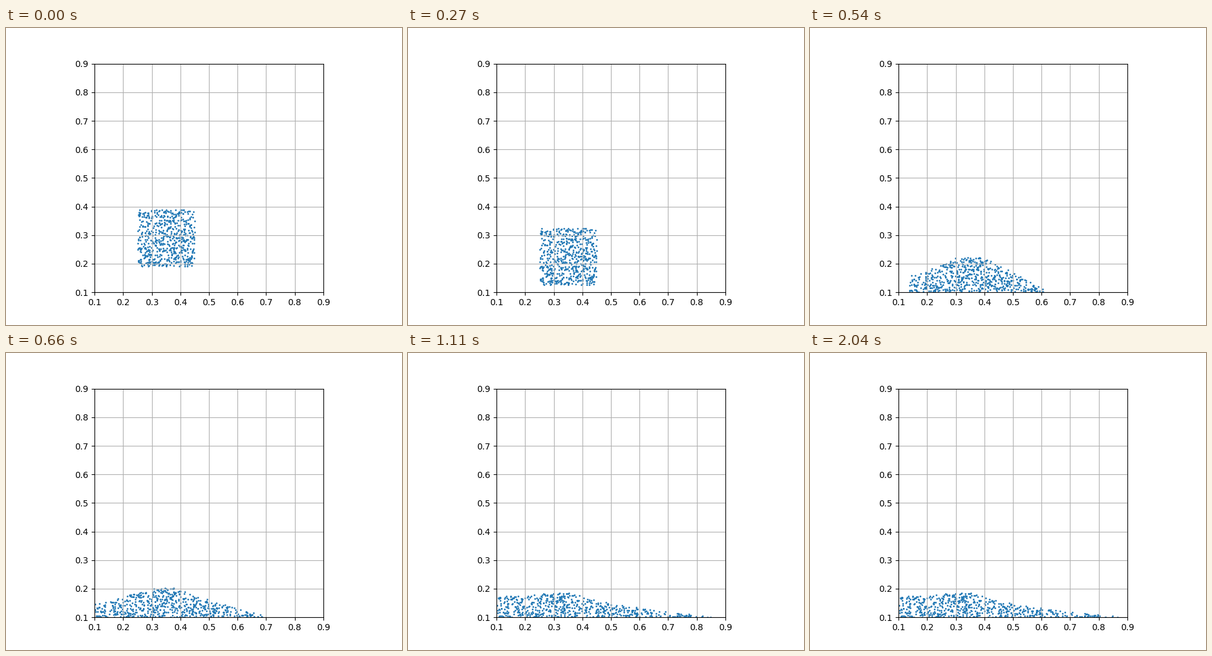
Animation, 640 px wide and 480 px high, one loop 2100 ms. Source, as a matplotlib script:

```python
import numpy as np
import matplotlib.pyplot as plt
from matplotlib.animation import FuncAnimation

FRAMES, INTERVAL = 70, 30
COUNT = 600
FLOOR, WALL = 0.099, 0.1
GRAVITY, LEAD = 0.000744, 5.2   # per frame^2, frames already fallen at start
T_HIT, T_SPLASH, T_SPREAD, T_SLOPE, T_REST = 10, 14, 22, 30, 47

rng = np.random.default_rng(7)
u, v = rng.random((2, COUNT))   # place of each grain within the block


def pile(height, base, top, bend):
    """Fill a mound evenly, keeping the grains in their layers.

    base, top and bend each hold a left and a right value.
    """
    h = np.linspace(0, 1, 400)
    left, right = (t + (b - t) * (1 - h) ** p
                   for b, t, p in zip(base, top, bend))
    left = np.maximum(left, WALL)
    area = np.cumsum(right - left)
    row = np.interp(v, area / area[-1], h)
    lo, hi = np.interp(row, h, left), np.interp(row, h, right)
    return np.array([lo + u * (hi - lo), FLOOR + height * row])


def falling(k):
    return np.array([0.25 + 0.2 * u,
                     0.2 + 0.2 * v - GRAVITY * (k + LEAD) ** 2 / 2])


def hermite(k, t0, t1, p0, p1, v0, v1):
    d = t1 - t0
    t = (k - t0) / d
    return (p0 * (1 + 2 * t) * (1 - t) ** 2 + v0 * d * t * (1 - t) ** 2
            + p1 * t * t * (3 - 2 * t) + v1 * d * t * t * (t - 1))


hit = falling(T_HIT)
splash = pile(0.164, (0.183, 0.535), (0.26, 0.41), (0.8, 0.75))
spread = pile(0.105, (-0.08, 0.72), (0.32, 0.39), (1, 1.25))
slope = pile(0.09, (-0.95, 0.83), (0.35, 0.36), (1, 1.35))

# The middle of the block is still a little above the floor at the splash.
splash[1] += 0.018 * np.sin(np.pi * u) ** 2 * (1 - v) ** 2

# The right flank stretches and thins while the left stays put.
reach = np.clip((slope[0] - 0.38) / 0.4, 0, 1.1)
slide = np.array([0.083 * reach ** 2,
                  (slope[1] - FLOOR) * (1 / (1 + 0.415 * reach) - 1)])
creep = 0.012 * reach * np.clip(1 - reach, 0, 1)

v_hit = np.array([0 * u, 0 * v - GRAVITY * (T_HIT + LEAD)])
v_splash = (spread - splash) / (T_SPREAD - T_SPLASH) * [[1.05], [1.8]]
v_spread = (slope - spread) / (T_SLOPE - T_SPREAD) * 1.5
v_slope = 2 * slide / (T_REST - T_SLOPE)

POSES = [(T_HIT, hit, v_hit), (T_SPLASH, splash, v_splash),
         (T_SPREAD, spread, v_spread), (T_SLOPE, slope, v_slope)]


def settling(k):
    t = min((k - T_SLOPE) / (T_REST - T_SLOPE), 1)
    p = slope + slide * (1 - (1 - t) ** 2)
    p[0] += creep * max(k - T_REST, 0) / (FRAMES - T_REST)
    return p


def grains(k):
    if k <= T_HIT:
        p = falling(k)
    elif k >= T_SLOPE:
        p = settling(k)
    else:
        for (t0, p0, v0), (t1, p1, v1) in zip(POSES, POSES[1:]):
            if t0 <= k < t1:
                p = hermite(k, t0, t1, p0, p1, v0, v1)
    return np.maximum(p.T, (WALL, FLOOR))


fig, ax = plt.subplots(figsize=(6.4, 4.8), dpi=100)
ticks = np.arange(1, 10) / 10
ax.set_aspect("equal")
ax.set(xlim=(0.1, 0.9), ylim=(0.1, 0.9), xticks=ticks, yticks=ticks)
ax.grid(True)
dots = ax.scatter(*grains(0).T, s=1, color="C0")


def update(k):
    dots.set_offsets(grains(k))
    return dots,


anim = FuncAnimation(fig, update, frames=FRAMES, interval=INTERVAL,
                     repeat=True, repeat_delay=0)
plt.show()
```
